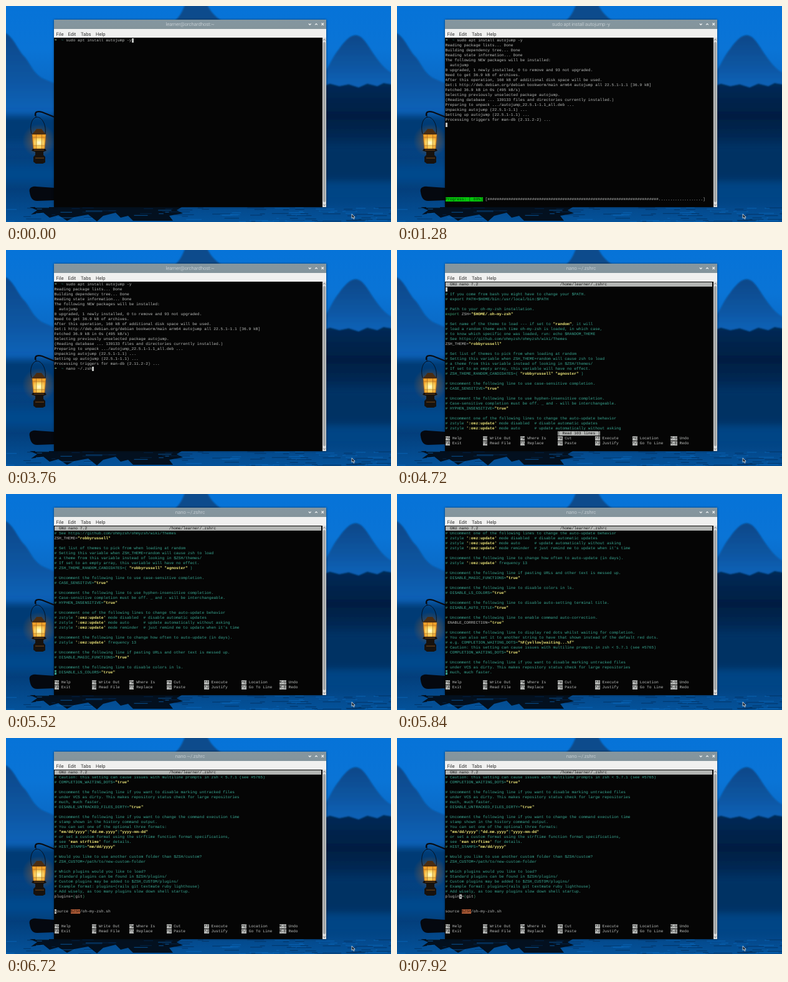
Animation of 618 by 348 pixels, one loop 8 s. Source, as an HTML page:

```html
<!DOCTYPE html>
<html lang="en">
<head>
<meta charset="utf-8">
<title>Terminal</title>
<style>
html, body { margin: 0; width: 100%; height: 100%; overflow: hidden; background: #04478c; }
#stage { position: relative; width: 618px; height: 348px; overflow: hidden; text-rendering: geometricPrecision; }
#stage > svg { position: absolute; left: 0; top: 0; }
#win { position: absolute; left: 77px; top: 22px; width: 437px; height: 302px; background: #050505; box-shadow: 0 0 3px #0008; }
#bar { height: 15px; background: linear-gradient(#8496a0, #84949b); color: #dfe5e8; text-align: center; font: 300 7.7px/15px Roboto, sans-serif; }
#menu { position: absolute; top: 15px; left: 0; width: 437px; height: 14px; background: #f0f0ef; color: #333; font: 7.6px/15px Roboto, sans-serif; }
#menu span { position: absolute; top: .5px; }
#scroll { position: absolute; left: 431px; top: 29px; width: 6px; height: 273px; background: #dcdcdc; }
#scroll i { position: absolute; left: 1px; top: 7px; width: 4px; height: 258px; border-radius: 2px; background: #a3a5a5; }
#term { position: absolute; left: .5px; top: 30px; width: 430px; height: 272px; margin: 0; overflow: hidden; color: #bcbebc; font: 6.28px/8px "Liberation Mono", monospace; }
#term span { padding: .45px 0; }
#term .c { color: #3aa893; }
#term .k { color: #3fa578; }
#term .s { color: #f1ea7c; font-weight: bold; }
#term .v { color: #2c1208; background: #b5603a; }
#term .g { color: #063d06; background: #05c40c; }
#term .r { color: #111; background: #b3b5b3; }
#term .a { display: inline-block; width: 3.77px; height: 8px; padding: 0; overflow: hidden; vertical-align: top; color: #9fd0a8; font-family: "DejaVu Sans", sans-serif; font-size: 4.6px; }
#term .cur { background: #c0c2c0; color: #111; }
#term .c.cur { background: #3aa893; }
</style>
</head>
<body>
<div id="stage">
<svg width="618" height="348" viewBox="0 0 618 348">
  <defs>
    <linearGradient id="sky" x2="0" y2="1">
      <stop offset="0" stop-color="#0673d8"/><stop offset=".2" stop-color="#0a74d6"/>
      <stop offset=".38" stop-color="#0a69c4"/><stop offset=".5" stop-color="#0657a4"/>
      <stop offset=".66" stop-color="#044281"/><stop offset=".85" stop-color="#033f7c"/>
      <stop offset="1" stop-color="#04529a"/>
    </linearGradient>
    <linearGradient id="hill" x2="0" y2="1">
      <stop offset="0" stop-color="#074889"/><stop offset=".5" stop-color="#0855a0"/>
      <stop offset="1" stop-color="#0a66be"/>
    </linearGradient>
    <linearGradient id="trees" x2="0" y2="1">
      <stop offset="0" stop-color="#032a57"/><stop offset=".5" stop-color="#021e42"/>
      <stop offset="1" stop-color="#033060"/>
    </linearGradient>
    <radialGradient id="glow">
      <stop offset="0" stop-color="#ffb02e" stop-opacity=".8"/><stop offset=".5" stop-color="#c86a14" stop-opacity=".28"/>
      <stop offset="1" stop-color="#c86a14" stop-opacity="0"/>
    </radialGradient>
    <radialGradient id="flame" cy=".58">
      <stop offset="0" stop-color="#fffde0"/><stop offset=".45" stop-color="#ffe474"/><stop offset="1" stop-color="#f0a02a"/>
    </radialGradient>
    <filter id="soft"><feGaussianBlur stdDeviation="1"/></filter>
    <filter id="fine"><feGaussianBlur stdDeviation=".6"/></filter>
    <filter id="haze"><feGaussianBlur stdDeviation="6"/></filter>
  </defs>
  <rect width="618" height="348" fill="url(#sky)"/>
  <g filter="url(#soft)">
    <path d="M268 26C280 18 284 6 288-4H322C328 8 334 17 350 26Z" fill="#0b4c8c"/>
    <path d="M-4 42C12 48 18 70 30 82C40 94 44 110 62 118L90 130V184H-4Z" fill="url(#hill)"/>
    <path d="M500 120C518 104 522 84 534 70C546 53 554 47 562 47C574 48 582 66 592 80C602 94 610 104 624 110V140H500Z" fill="url(#hill)"/>
    <path d="M505 130L520 125L535 129L550 126L566 131L580 125L596 129L606 124L624 127V232H505Z" fill="url(#trees)"/>
  </g>
  <g filter="url(#haze)">
    <rect x="-15" y="176" width="105" height="44" fill="#043a75"/>
    <rect x="500" y="222" width="135" height="60" fill="#033364"/>
    <rect x="500" y="284" width="135" height="34" fill="#044585"/>
    <rect x="-15" y="256" width="105" height="28" fill="#05498c"/>
  </g>
  <g filter="url(#fine)">
    <path d="M38 300C36 293 42 290 49 291L78 293V313L50 314C42 314 39 308 38 300Z" fill="#05080f"/>
    <path d="M38 324H282L274 329L284 334L262 338L268 346H204L196 338L184 341L176 333L156 338L146 347L132 336L110 340L98 346L84 337L70 341L60 333L40 336L50 329Z" fill="#03101f"/>
  </g>
  <g id="ripples" filter="url(#fine)"></g>
  <circle cx="53" cy="217" r="27" fill="url(#glow)"/>
  <g fill="none" stroke="#080b12">
    <path d="M47 177C46 170 51 169 58 171L78 179" stroke-width="2.2"/>
    <path d="M48 174V180M41 206C37 190 43 179 50 179S65 190 63 206" stroke-width=".9"/>
  </g>
  <path d="M46 202L49 198H57L60 202L64 207H41Z" fill="#4a2d12"/>
  <path d="M42 207H64L62 230H44Z" fill="url(#flame)"/>
  <path d="M42 207L44 230M48.500 207V230M57.500 207V230M64 207L62 230M42 212H64M43 225H63" stroke="#9a5c18" stroke-width=".6" fill="none"/>
  <path d="M43 230H63L65 233L60 235V240L63 243V252L59 254H48L44 251V243L47 240V235L41 233Z" fill="#17120e"/>
  <path d="M45 232H61M47 245H61" stroke="#7d4d1c" stroke-width="1"/>
</svg>
<div id="win">
  <div id="bar"></div>
  <div id="menu"><span style="left:3.500px">File</span><span style="left:22.500px">Edit</span><span style="left:43px">Tabs</span><span style="left:67px">Help</span></div>
  <pre id="term"></pre>
  <div id="scroll"><i></i></div>
</div>
<svg width="618" height="348" viewBox="0 0 618 348" fill="none">
  <path d="M485.800 28.500L487.700 30.400L489.600 28.500M496.100 30.400L498 28.500L499.900 30.400M506.500 27.500L510 31M510 27.500L506.500 31" stroke="#f4f6f7" stroke-width="1.100"/>
  <path d="M509.200 55.500L511 53.500L512.800 55.500M509.200 319.500L511 321.500L512.800 319.500" stroke="#666" stroke-width=".9"/>
  <path d="M555 335V342L556.700 340.600L558 343.300L559.300 342.700L558 340.200H560.200Z" fill="#15202e" stroke="#dfe5ea" stroke-width=".8"/>
</svg>
</div>
<script>
const LOOP = 8000, TICK = 80, EDIT_ROWS = 29, COLS = 114;
const term = document.getElementById("term"), bar = document.getElementById("bar");
const HOME_TITLE = "learner@orchardhost:~";
const INSTALL = "sudo apt install autojump -y", NANO = "nano ~/.zshrc";

// [time, line]
const aptLog = [
  [160, "Reading package lists... Done"],
  [400, "Building dependency tree... Done"],
  [480, "Reading state information... Done"],
  [560, "The following NEW packages will be installed:"],
  [560, "  autojump"],
  [560, "0 upgraded, 1 newly installed, 0 to remove and 93 not upgraded."],
  [560, "Need to get 36.9 kB of archives."],
  [560, "After this operation, 160 kB of additional disk space will be used."],
  [640, "Get:1 http://deb.debian.org/debian bookworm/main arm64 autojump all 22.5.1-1.1 [36.9 kB]"],
  [720, "Fetched 36.9 kB in 0s (495 kB/s)"],
  [880, "Selecting previously unselected package autojump."],
  [880, "(Reading database ... 139133 files and directories currently installed.)"],
  [960, "Preparing to unpack .../autojump_22.5.1-1.1_all.deb ..."],
  [960, "Unpacking autojump (22.5.1-1.1) ..."],
  [1040, "Setting up autojump (22.5.1-1.1) ..."],
  [1120, "Processing triggers for man-db (2.11.2-2) ..."]
];
const progress = [[880, 20], [960, 40], [1040, 60], [1120, 80]];

const rc = `
# If you come from bash you might have to change your $PATH.
# export PATH=$HOME/bin:/usr/local/bin:$PATH

# Path to your oh-my-zsh installation.
export ZSH="$HOME/.oh-my-zsh"

# Set name of the theme to load --- if set to "random", it will
# load a random theme each time oh-my-zsh is loaded, in which case,
# to know which specific one was loaded, run: echo $RANDOM_THEME
# See https://github.com/ohmyzsh/ohmyzsh/wiki/Themes
ZSH_THEME="robbyrussell"

# Set list of themes to pick from when loading at random
# Setting this variable when ZSH_THEME=random will cause zsh to load
# a theme from this variable instead of looking in $ZSH/themes/
# If set to an empty array, this variable will have no effect.
# ZSH_THEME_RANDOM_CANDIDATES=( "robbyrussell" "agnoster" )

# Uncomment the following line to use case-sensitive completion.
# CASE_SENSITIVE="true"

# Uncomment the following line to use hyphen-insensitive completion.
# Case-sensitive completion must be off. _ and - will be interchangeable.
# HYPHEN_INSENSITIVE="true"

# Uncomment one of the following lines to change the auto-update behavior
# zstyle ':omz:update' mode disabled  # disable automatic updates
# zstyle ':omz:update' mode auto      # update automatically without asking
# zstyle ':omz:update' mode reminder  # just remind me to update when it's time

# Uncomment the following line to change how often to auto-update (in days).
# zstyle ':omz:update' frequency 13

# Uncomment the following line if pasting URLs and other text is messed up.
# DISABLE_MAGIC_FUNCTIONS="true"

# Uncomment the following line to disable colors in ls.
# DISABLE_LS_COLORS="true"

# Uncomment the following line to disable auto-setting terminal title.
# DISABLE_AUTO_TITLE="true"

# Uncomment the following line to enable command auto-correction.
 ENABLE_CORRECTION="true"

# Uncomment the following line to display red dots whilst waiting for completion.
# You can also set it to another string to have that shown instead of the default red dots.
# e.g. COMPLETION_WAITING_DOTS="%F{yellow}waiting...%f"
# Caution: this setting can cause issues with multiline prompts in zsh < 5.7.1 (see #5765)
# COMPLETION_WAITING_DOTS="true"

# Uncomment the following line if you want to disable marking untracked files
# under VCS as dirty. This makes repository status check for large repositories
# much, much faster.
# DISABLE_UNTRACKED_FILES_DIRTY="true"

# Uncomment the following line if you want to change the command execution time
# stamp shown in the history command output.
# You can set one of the optional three formats:
# "mm/dd/yyyy"|"dd.mm.yyyy"|"yyyy-mm-dd"
# or set a custom format using the strftime function format specifications,
# see 'man strftime' for details.
# HIST_STAMPS="mm/dd/yyyy"

# Would you like to use another custom folder than $ZSH/custom?
# ZSH_CUSTOM=/path/to/new-custom-folder

# Which plugins would you like to load?
# Standard plugins can be found in $ZSH/plugins/
# Custom plugins may be added to $ZSH_CUSTOM/plugins/
# Example format: plugins=(rails git textmate ruby lighthouse)
# Add wisely, as too many plugins slow down shell startup.
plugins=(git)


source $ZSH/oh-my-zsh.sh
`.split("\n");

const helpRows = [
  "^G Help|^O Write Out|^W Where Is|^K Cut|^T Execute|^C Location|M-U Undo",
  "^X Exit|^R Read File|^\\ Replace|^U Paste|^J Justify|^/ Go To Line|M-E Redo"
];

const esc = s => s.replace(/&/g, "&amp;").replace(/</g, "&lt;");
const span = (cls, s) => `<span class="${cls}">${esc(s)}</span>`;
const cursor = span("cur", " ");
const prompt = cmd => span("a", "➜") + "  " + span("c", "~") + " " + esc(cmd);
const typed = (text, t, start, gap) => text.slice(0, Math.max(0, Math.floor((t - start) / gap)));

function highlight(line, curCol) {
  const cls = Array(line.length).fill(line[0] === "#" ? "c" : "");
  const paint = (re, name) => {
    for (const m of line.matchAll(re)) cls.fill(name, m.index, m.index + m[0].length);
  };
  paint(/"[^"]*"|'[^']*'/g, "s");
  if (line[0] !== "#") {
    paint(/^export|[()]/g, "k");
    if (line.startsWith("source")) paint(/\$ZSH/g, "v");
  }
  if (curCol >= line.length) return esc(line) + cursor;
  if (curCol >= 0) cls[curCol] += " cur";
  let out = "";
  for (let i = 0, j; i < line.length; i = j) {
    for (j = i + 1; j < line.length && cls[j] === cls[i];) j++;
    const part = line.slice(i, j);
    out += cls[i] ? span(cls[i], part) : esc(part);
  }
  return out;
}

function shell(t) {
  const rows = [prompt(INSTALL)];
  if (t < 80) return rows[0] + cursor;
  for (const [at, line] of aptLog) if (t >= at) rows.push(esc(line));
  if (t >= 1920) {
    const cmd = t < 2800 ? typed("nano ", t, 2160, 100) : "nano " + typed(NANO.slice(5), t, 2800, 150);
    rows.push(t < 4240 ? prompt(cmd) + cursor : prompt(cmd) + "\n" + cursor);
  } else {
    rows.push(cursor);
    const step = progress.filter(p => t >= p[0]).pop();
    if (step && t < 1760) {
      while (rows.length < 32) rows.push("");
      const done = Math.floor(92 * step[1] / 100);
      rows.push(span("g", `Progress: [ ${step[1]}%]`) + " [" + "#".repeat(done) + ".".repeat(92 - done) + "]");
    }
  }
  return rows.join("\n");
}

function editor(t) {
  const last = rc.length;
  const low = Math.min(last, Math.max(1, Math.floor((t - 4760) / 20) + 1));
  const ups = Math.min(4, Math.max(0, Math.floor((t - 6560) / 120)));
  const col = Math.min(6, Math.max(0, Math.floor((t - 7120) / 120)));
  const top = Math.max(0, low - EDIT_ROWS), line = low - ups;
  const rows = [span("r", ("  GNU nano 7.2".padEnd(49) + "/home/learner/.zshrc").padEnd(COLS))];
  for (let i = top; i < top + EDIT_ROWS; i++) rows.push(highlight(rc[i], i === line - 1 ? col : -1));
  rows.push(low <= 20 ? " ".repeat(48) + span("r", "[ Read 103 lines ]") : "");
  for (const row of helpRows) {
    rows.push(row.split("|").map(item => {
      const n = item.indexOf(" ");
      return span("r", item.slice(0, n)) + esc(item.slice(n).padEnd(16 - n));
    }).join(""));
  }
  return rows.join("\n");
}

function titleAt(t) {
  if (t >= 4240) return NANO;
  return t >= 80 && t < 1920 ? INSTALL : HOME_TITLE;
}

function drawRipples() {
  let seed = 7, out = "";
  const rnd = () => (seed = seed * 16807 % 2147483647) / 2147483647;
  for (let i = 0; i < 100; i++) {
    const x = rnd() * 618, y = 324 + rnd() * 24, w = 6 + rnd() * 26;
    const fill = rnd() < (x > 280 ? .55 : .4) ? "#0a6cc0" : "#032a56";
    out += `<rect x="${x}" y="${y}" width="${w}" height="1.2" fill="${fill}" opacity=".6"/>`;
  }
  document.getElementById("ripples").innerHTML = out;
}

let shown = -1;
function frame() {
  const t = Math.floor(performance.now() % LOOP / TICK) * TICK;
  if (t !== shown) {
    shown = t;
    bar.textContent = titleAt(t);
    term.innerHTML = t < 4480 ? shell(t) : editor(t);
  }
  requestAnimationFrame(frame);
}
drawRipples();
frame();
</script>
</body>
</html>
```
